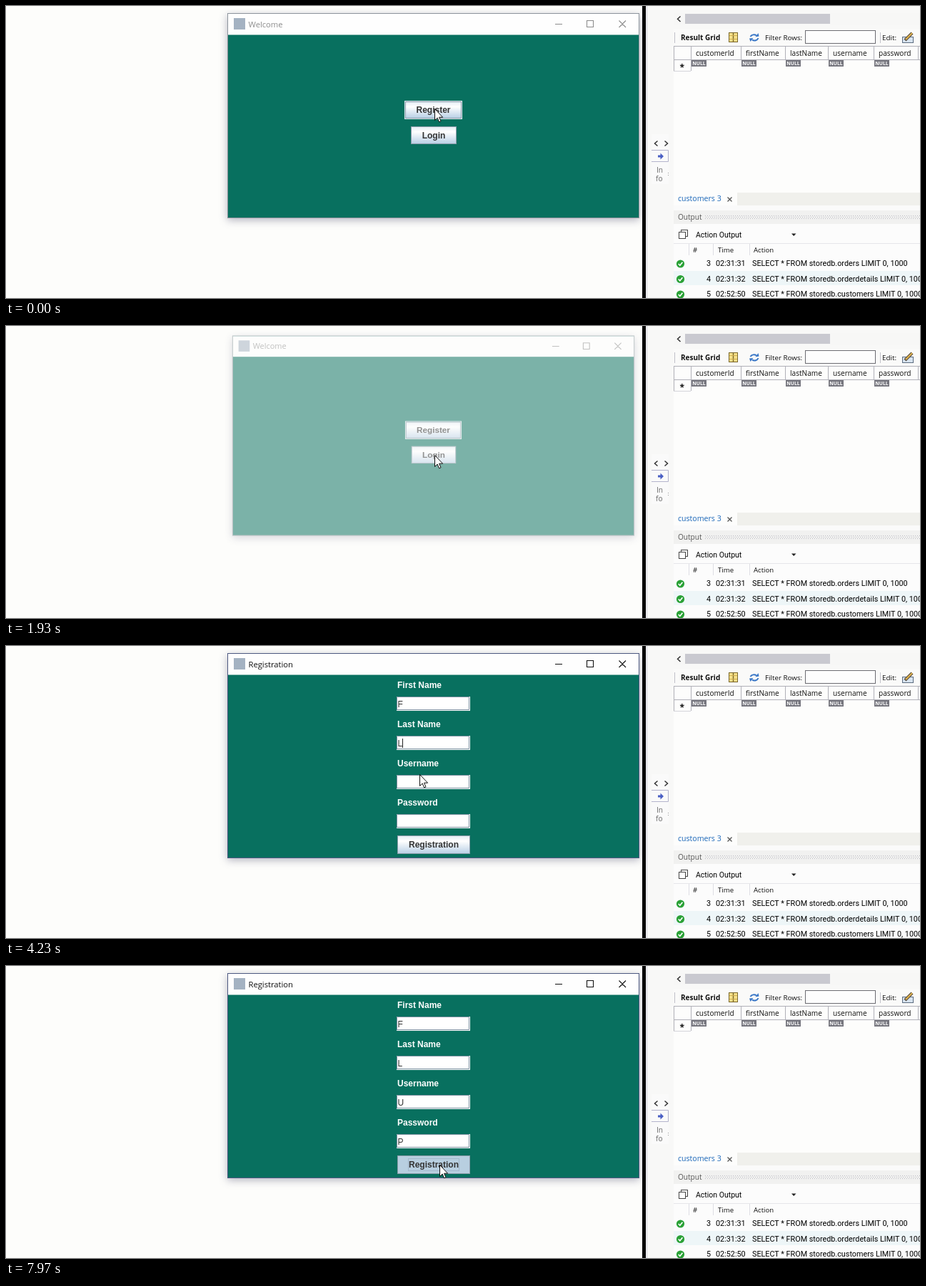
An HTML page that plays this animation: 1280x410 px, repeating every 8000 ms.

```html
<!DOCTYPE html>
<html lang="en">
<head>
<meta charset="utf-8">
<title>Registration demo</title>
<style>
  html, body { margin: 0; width: 100%; height: 100%; overflow: hidden; background: #fdfdfb; }
  svg { display: block; }
  text { white-space: pre; }
  .ui { font: 10.1px "Open Sans", "Noto Sans", sans-serif; fill: #111; }
  .log { font: 10.8px Roboto, "Liberation Sans", sans-serif; fill: #000; }
  .title { font: 11.2px "Open Sans", "Noto Sans", sans-serif; }
  .bold { font: bold 12px "Liberation Sans", Arial, sans-serif; fill: #333; }
  .label { fill: #fff; }
  .input { font: 12px "Liberation Sans", Arial, sans-serif; fill: #333; }
  .window { filter: drop-shadow(0 3px 6px rgba(50, 50, 90, .35)); }
  .dialog { filter: drop-shadow(0 3px 9px rgba(0, 0, 20, .6)); }
</style>
</head>
<body>
<svg id="stage" width="1280" height="410" viewBox="0 0 1280 410">
  <defs>
    <linearGradient id="metal" x1="0" y1="0" x2="0" y2="1">
      <stop offset="0" stop-color="#e4ecf4"/>
      <stop offset=".3" stop-color="#fff"/>
      <stop offset="1" stop-color="#b8cfe5"/>
    </linearGradient>
    <radialGradient id="ball" cx=".38" cy=".3" r=".75">
      <stop offset="0" stop-color="#e6e6f2"/>
      <stop offset="1" stop-color="#a9a9c8"/>
    </radialGradient>
  </defs>
  <g id="panel"></g>
  <g id="welcome" class="window"></g>
  <g id="form" class="window"></g>
  <g id="dialog" class="dialog"></g>
  <g id="cursor">
    <path id="arrow" d="M.5 .5V16.5L4.2 13L6.6 18.8L9 17.8L6.6 12.2H11.6Z" fill="#fff" stroke="#111"/>
    <path id="beam" d="M-3 -7.5H-1L0 -6.5L1 -7.5H3M0 -6.5V6.5M-3 7.5H-1L0 6.5L1 7.5H3" fill="none" stroke="#111" stroke-width="1.3"/>
  </g>
</svg>
<script>
const $ = id => document.getElementById(id);
const rect = (x, y, w, h, fill, stroke = 'none', extra = '') =>
  `<rect x="${x}" y="${y}" width="${w}" height="${h}" fill="${fill}" stroke="${stroke}" ${extra}/>`;
const text = (x, y, str, cls = 'ui', extra = '') =>
  `<text x="${x}" y="${y}" class="${cls}" ${extra}>${str}</text>`;
const line = (d, color, width = 1, extra = '') =>
  `<path d="${d}" fill="none" stroke="${color}" stroke-width="${width}" ${extra}/>`;
const shape = (d, fill) => `<path d="${d}" fill="${fill}"/>`;

// ---- Static database panel ----
function sidebar() {
  return rect(891, 0, 5, 410, '#000')
    + rect(896, 0, 384, 410, '#f8f8f7')
    + rect(897, 0, 1, 410, '#d4d4de')
    + rect(904, 180, 24, 70, '#fafafa')
    + line('M912.5 189.5L908.5 193L912.5 196.5M922.5 189.5L926.5 193L922.5 196.5', '#333', 1.5)
    + line('M904 202.5H927.5V218.5H904', '#b4b4cc')
    + shape('M913 209.5H916.5V206.5L921 211L916.5 215.5V212.5H913Z', '#4a5fc4')
    + text(911, 234, 'In', 'ui', 'style="fill:#666"') + text(910, 246, 'fo', 'ui', 'style="fill:#666"')
    + line('M927.5 234V240', '#999', 1, 'stroke-dasharray="1 2"');
}

function resultGrid() {
  const columns = [['customerId', 959, 966], ['firstName', 1029, 1036], ['lastName', 1091, 1098],
    ['username', 1151, 1158], ['password', 1215, 1222]];
  return rect(935, 10, 345, 16, '#f7f7f6')
    + line('M944.5 14.5L940.5 18.3L944.5 22', '#333', 1.5)
    + rect(951, 11, 203, 14, '#c9c9d0')
    + rect(935, 32, 345, 24, '#fafaf9')
    + line('M936.5 37V52M1224.5 37V52', '#c0c0c8')
    + text(945, 48, 'Result Grid', 'ui', 'style="font-weight:bold;font-size:10px"')
    + rect(1012.5, 37.5, 12, 13, '#f6e08a', '#7a682c')
    + line('M1018.5 38V50', '#7a682c', 1.4)
    + line('M1013 41.5H1024M1013 46.5H1024', '#d0b050')
    + line('M1042.5 43A5.5 5 0 0 1 1051 41.5M1053.5 45A5.5 5 0 0 1 1045 47.5', '#3976c6', 2)
    + shape('M1049.5 43.5L1054.5 42.5L1053.5 38ZM1041 45.5L1046.5 45L1042.5 50Z', '#3976c6')
    + text(1063, 48, 'Filter Rows:', 'ui', 'style="font-size:9.8px"')
    + rect(1119.5, 34.5, 98, 18, '#fdfdfd', '#6c6c72')
    + text(1227, 48, 'Edit:', 'ui', 'style="font-size:9.8px"')
    + rect(1255.5, 43.5, 15, 8, '#d8e4f0', '#5c6c80')
    + line('M1259 48L1269 38', '#54483a', 4.2) + line('M1260 47L1269 38', '#e1b34e', 2.2)
    + rect(935, 56, 345, 206, '#fdfdfc')
    + line('M935 56.5H1280M935 75.5H1280M935.5 56V91', '#b0b0b8')
    + line('M935 91.5H959', '#d4d4da')
    + line('M959.5 56V91', '#b0b0b8')
    + text(943.5, 91, '*', 'ui', 'style="font-size:12px;font-weight:bold"')
    + columns.map(([name, x, tx]) => line(`M${x + .5} 56V75`, '#b0b0b8')
      + text(tx, 69.5, name)
      + rect(x + 1, 76, 21, 9, '#76767e')
      + text(x + 11.5, 83, 'NULL', 'ui', 'text-anchor="middle" style="font-size:6.8px;font-weight:bold;fill:#fff"')).join('')
    + line('M1277.5 56V75', '#b0b0b8')
    + rect(935, 262, 345, 18, '#f0f0ec') + rect(935, 261, 89, 19, '#fdfdfc')
    + text(941, 274, 'customers 3', 'ui', 'style="font-size:10.6px;fill:#1a66b8"')
    + line('M1010.5 268.5L1016.5 274.5M1016.5 268.5L1010.5 274.5', '#555', 1.3);
}

function outputLog() {
  const rows = [[3, '02:31:31', 'orders'], [4, '02:31:32', 'orderdetails'], [5, '02:52:50', 'customers']];
  return rect(935, 280, 345, 7, '#fafafa') + rect(935, 287, 345, 19, '#f1f1f0')
    + text(941, 300, 'Output', 'ui', 'style="fill:#555"')
    + [294.5, 296.5, 298.5].map((y, i) =>
      line(`M${979 + i % 2} ${y}H1280`, '#bcbcc4', 1, 'stroke-dasharray="1 2"')).join('')
    + rect(935, 306, 345, 104, '#fcfcfc')
    + rect(945.5, 314.5, 9, 9, '#fff', '#444') + rect(942.5, 317.5, 9, 9, '#fff', '#444')
    + text(966, 325, 'Action Output', 'log', 'style="font-size:10.5px"')
    + shape('M1100 319.5H1106.5L1103.2 323Z', '#222')
    + line('M935 333.5H1280', '#e6e6ea')
    + line('M956.5 334V350M990.5 334V350M1041.5 334V350', '#dedee4')
    + text(962, 346, '#', 'ui', 'style="font-size:9.5px"') + text(997, 346, 'Time', 'ui', 'style="font-size:9.6px"')
    + text(1047, 346, 'Action', 'ui', 'style="font-size:9.6px"')
    + rect(935, 372, 345, 20, '#eef6f8')
    + rows.map(([n, time, table], i) => {
      const y = 361 + i * 21.5;
      return `<circle cx="944.5" cy="${y + 1}" r="5.6" fill="#2aa136"/>`
        + line(`M941.7 ${y + 1}L943.8 ${y + 3.2}L947.4 ${y - 1.3}`, '#fff', 1.6)
        + text(987, y + 4, n, 'log', 'text-anchor="end"') + text(994, y + 4, time, 'log')
        + text(1045, y + 4, `SELECT * FROM storedb.${table} LIMIT 0, 1000`, 'log');
    }).join('');
}

// ---- Windows ----
function frame(title, active) {
  const ink = active ? '#111' : '#8c8c8c';
  return rect(310.5, 10.5, 576, 287, '#08705f', active ? '#4c5880' : '#8c949c')
    + rect(311, 11, 575, 29.5, '#fefefe')
    + rect(319, 17, 16, 16, '#a4b2c2')
    + text(339.5, 29.5, title, 'title', `fill="${ink}"`)
    + line('M769 25.5H779M813.5 20.5H822.5V29.5H813.5ZM858.5 20.5L868 30M868 20.5L858.5 30', ink, 1.1);
}

const button = (x, y, w, h, name, id = '') =>
  rect(x + .5, y + .5, w - 1, h - 1, 'url(#metal)', '#8c9caa', id && `id="${id}"`)
  + text(x + w / 2, y + h / 2 + 4.2, name, 'bold', 'text-anchor="middle"');

const fieldTop = i => 71 + i * 55;
const fields = [
  { label: 'First Name', key: 'F', focus: 2330, typed: 2730 },
  { label: 'Last Name', key: 'L', focus: 3260, typed: 3780 },
  { label: 'Username', key: 'U', focus: 4620, typed: 5180 },
  { label: 'Password', key: 'P', focus: 6080, typed: 6560 }
];
const submitAt = 7900;

const fieldMarkup = ({ label, key }, i) => {
  const y = fieldTop(i);
  return text(548, y - 12.5, label, 'bold label')
    + rect(547, y, 103, 20, '#fff')
    + line(`M547.5 ${y + 18.5}V${y + .5}H648.5V${y + 18.5}H547`, '#7a8f9f')
    + text(548.5, y + 15, key, 'input', `id="key${i}"`)
    + line(`M0 ${y + 4}V${y + 17}`, '#222', 1, `id="caret${i}"`);
};

$('panel').innerHTML = sidebar() + resultGrid() + outputLog();

$('welcome').innerHTML = frame('Welcome', false)
  + rect(558.5, 133.5, 80, 25, 'none', '#dfeaf0')
  + button(559, 134, 79, 24, 'Register')
  + button(567, 169, 64, 25, 'Login');

$('form').innerHTML = frame('Registration', true)
  + fields.map(fieldMarkup).join('')
  + button(548, 266, 102, 26, 'Registration', 'submit')
  + rect(563.5, 270.5, 71, 17, 'none', '#a3b8cc', 'id="submitFocus"');

$('dialog').innerHTML = rect(469.5, 94.5, 258, 118, '#eeeef0', '#70707c')
  + rect(470, 95, 257, 29, '#fff')
  + text(477.5, 113, 'Register', 'title', 'fill="#111"')
  + line('M708 104L717.5 113.5M717.5 104L708 113.5', '#111', 1.2)
  + '<circle cx="494.5" cy="148.5" r="13" fill="#00003030"/>'
  + '<circle cx="493" cy="147" r="12.5" fill="url(#ball)" stroke="#70708c"/>'
  + text(493, 154, 'i', 'bold', 'text-anchor="middle" style="font-size:20px;fill:#4a4a5c"')
  + text(526, 154.5, 'We are redirecting you to register', 'bold')
  + button(579, 175, 38, 25, 'OK', 'ok')
  + rect(580.5, 176.5, 35, 22, 'none', '#7a8a99')
  + rect(588.5, 179.5, 19, 16, 'none', '#a3b8cc');

// ---- Motion ----
const clamp = v => Math.max(0, Math.min(1, v));
const easeOut = p => 1 - (1 - p) ** 3;
const easeInOut = p => p * p * (3 - 2 * p);

// Opacity and scale share one level, as the desktop does when a window opens or closes.
function showWindow(id, t, cx, cy, openAt, closeAt) {
  const level = t < closeAt ? easeOut(clamp((t - openAt) / 250)) : 1 - easeOut(clamp((t - closeAt) / 160));
  const node = $(id);
  const scale = .95 + .05 * level;
  node.style.display = level > 0 ? '' : 'none';
  node.style.opacity = level;
  node.setAttribute('transform', level < 1
    ? `translate(${cx} ${cy}) scale(${scale}) translate(${-cx} ${-cy})` : '');
}

const path = [
  [0, 600, 144], [500, 600, 144], [1150, 599, 180], [1750, 599, 180], [2130, 601, 183],
  [2450, 601, 183], [2880, 591, 142], [3950, 591, 142], [4230, 579, 180], [4480, 576, 191],
  [5250, 576, 191], [5760, 555, 250], [6750, 555, 250], [7480, 607, 279], [8000, 607, 279]
];

function pointerAt(t) {
  const i = path.findIndex(p => p[0] > t);
  const [t0, x0, y0] = path[i - 1], [t1, x1, y1] = path[i];
  const p = easeInOut((t - t0) / (t1 - t0));
  return [Math.round(x0 + (x1 - x0) * p), Math.round(y0 + (y1 - y0) * p)];
}

const show = (id, on) => { $(id).style.visibility = on ? 'visible' : 'hidden'; };

const formOpensAt = 2112;

function draw(t) {
  showWindow('welcome', t, 598.5, 154, -1000, 1900);
  showWindow('dialog', t, 598.5, 153.5, 20, 1600);
  showWindow('form', t, 598.5, 154, formOpensAt, 9000);
  $('ok').setAttribute('fill', t >= 1460 && t < 1580 ? '#b8cfe5' : 'url(#metal)');

  fields.forEach(({ focus, typed, key }, i) => {
    const blur = i < 3 ? fields[i + 1].focus : submitAt;
    show('key' + i, t >= typed);
    show('caret' + i, t >= focus && t < blur);
    const caretX = t < typed ? 549.5 : key === 'U' ? 557.5 : 555.5;
    $('caret' + i).setAttribute('transform', `translate(${caretX} 0)`);
  });
  $('submit').setAttribute('fill', t >= submitAt ? '#b8cfe0' : 'url(#metal)');
  show('submitFocus', t >= submitAt);

  const [x, y] = pointerAt(t);
  const overField = t >= formOpensAt && fields.some((f, i) => y > fieldTop(i) && y < fieldTop(i) + 20);
  $('cursor').setAttribute('transform', `translate(${x} ${y})`);
  show('arrow', !overField);
  show('beam', overField);
}

const start = performance.now();
function tick() {
  draw((performance.now() - start) % 8000);
  requestAnimationFrame(tick);
}
tick();
</script>
</body>
</html>
```
